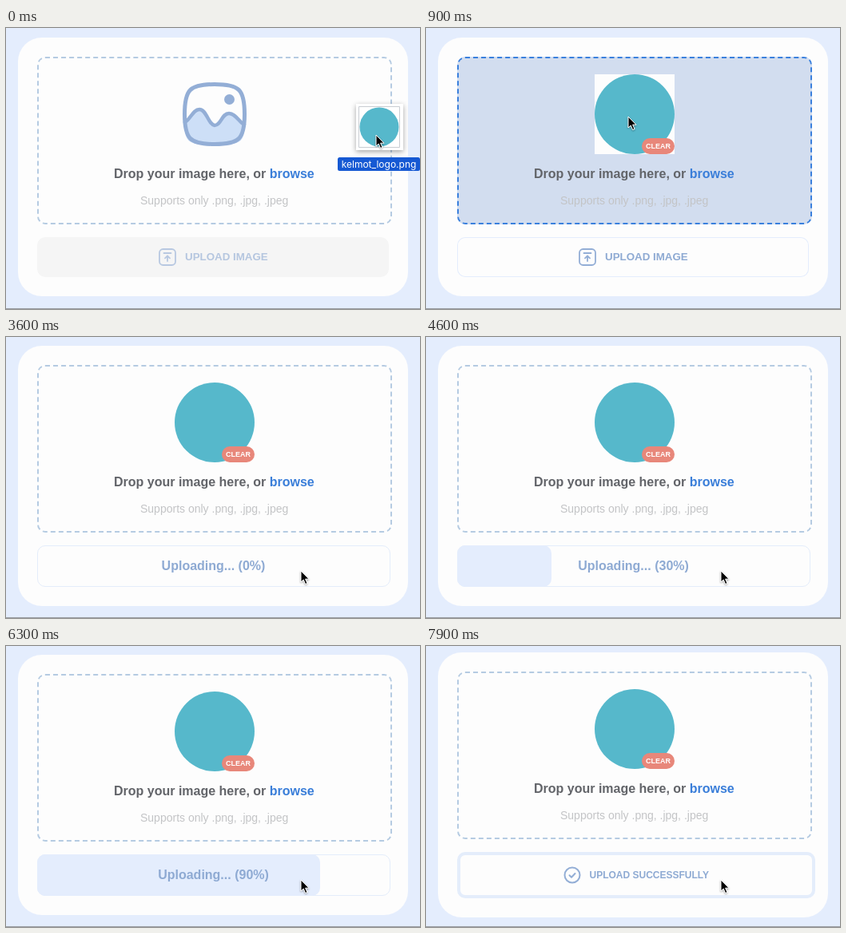
These frames come from a looping animation (518x352 px, 8000 ms). An HTML page:

```html
<!DOCTYPE html>
<html lang="en">
<head>
<meta charset="utf-8">
<title>Image upload</title>
<style>
  html, body { margin: 0; width: 100%; height: 100%; overflow: hidden; background: #e4edfd; }
  #stage { position: relative; width: 518px; height: 352px; overflow: hidden; }
  #stage > * { position: absolute; box-sizing: border-box; }
  #card { left: 15px; width: 488px; border-radius: 30px; background: #fdfdfd; }
  #zone { left: 39px; width: 444px; height: 210px; border: 2px dashed; border-radius: 10px; }
  #button { left: 39px; border: 0 solid #e4edfb; border-radius: 10px; }
  #bar { left: 39px; border-radius: 10px; background: #e4edfd; }
  svg { left: 0; top: 0; }
  text { font-family: "Liberation Sans", Arial, sans-serif; font-weight: bold; }
  .line { fill: none; stroke: #93aed6; stroke-linecap: round; stroke-linejoin: round; }
</style>
</head>
<body>
<div id="stage">
  <div id="card"></div>
  <div id="zone"></div>
  <div id="button"></div>
  <div id="bar"></div>
  <svg width="518" height="352" viewBox="0 0 518 352">
    <defs>
      <filter id="soft" x="-40%" y="-40%" width="180%" height="180%">
        <feDropShadow dx="0" dy="2" stdDeviation="3" flood-color="#000" flood-opacity=".35"/>
      </filter>
      <filter id="tight" x="-40%" y="-40%" width="180%" height="180%">
        <feDropShadow dx="0" dy="1" stdDeviation="1" flood-color="#000" flood-opacity=".4"/>
      </filter>
    </defs>
    <g id="content">
      <g id="placeholder">
        <path fill="#cddff7" d="M224 118C231 114 234 102 242 102C251 102 253 121 261 122C269 122 270 107 279 107C287 107 292 118 298 121V128Q298 145 281 145H241Q224 145 224 128Z"/>
        <path class="line" stroke-width="4.5" d="M224 118C231 114 234 102 242 102C251 102 253 121 261 122C269 122 270 107 279 107C287 107 292 118 298 121"/>
        <path class="line" stroke-width="5" d="M261 70.500C292 70.500 298.500 77 298.500 108S292 145.500 261 145.500S223.500 139 223.500 108S230 70.500 261 70.500Z"/>
        <circle cx="279.500" cy="89.500" r="6.500" fill="#93aed6"/>
      </g>
      <g id="preview">
        <path fill="#fdfdfd" d="M211 58h100v100h-100z"/>
        <circle cx="261" cy="108" r="50" fill="#56b8cb"/>
        <rect x="270" y="138" width="41" height="20" rx="10" fill="#e8877a"/>
        <text x="290.500" y="151.200" font-size="9" fill="#fff" text-anchor="middle">CLEAR</text>
      </g>
      <text x="135" y="188" font-size="16" fill="#626469">Drop your image here, or <tspan fill="#3a7ed9">browse</tspan></text>
      <text x="168" y="221" font-size="14" fill="#c3c4c6" style="font-weight:normal">Supports only .png, .jpg, .jpeg</text>
    </g>
    <g id="ready">
      <rect class="line" x="192" y="277" width="20" height="20" rx="4.500" stroke-width="1.800"/>
      <path class="line" stroke-width="1.800" d="M197.500 282H206.500M202 292V285.500M199 288.300L202 285.300L205 288.300"/>
      <text x="224" y="291" font-size="13.333" fill="#8eaad3">UPLOAD IMAGE</text>
    </g>
    <text id="percent" x="259.500" y="292" font-size="16" fill="#8eaad3" text-anchor="middle"></text>
    <g id="done">
      <circle class="line" cx="183" cy="287" r="9.500" stroke-width="2"/>
      <path class="line" stroke-width="2" d="M179.500 287.300L182 289.700L186.500 285"/>
      <text x="204.500" y="291" font-size="12" fill="#8eaad3">UPLOAD SUCCESSFULLY</text>
    </g>
    <path fill="#9a9da3" d="M0 351H518V352H0Z"/>
    <g id="cursor">
      <g id="ghost">
        <path filter="url(#soft)" fill="#fff" d="M-25-39h59v58h-59z"/>
        <path fill="none" stroke="#c9cdd2" d="M-21.500-35.500h51v51h-51z"/>
        <circle cx="4" cy="-10" r="24.500" fill="#56b8cb"/>
        <rect x="-48" y="28" width="103" height="17" rx="2.500" fill="#1659d3"/>
        <text x="3.500" y="41" font-size="12" fill="#fff" text-anchor="middle" style="font-family:Inter,sans-serif;font-weight:normal">kelmot_logo.png</text>
      </g>
      <path filter="url(#tight)" fill="#000" stroke="#fff" stroke-width="1" d="M0 0V14L3.200 11L5.600 16.500L8 15.500L5.600 10.200H10Z"/>
    </g>
  </svg>
</div>
<script>
const LOOP = 8000, DROP = 720, CLICK = 3000, SUCCESS = 6600;
const UPLOADS = [4300, 5280, 6105];
const $ = id => document.getElementById(id);
const clamp = v => Math.max(0, Math.min(1, v));
const mix = (a, b, k) => a + (b - a) * k;
const rgb = (a, b, k) => `rgb(${a.map((v, i) => Math.round(mix(v, b[i], k)))})`;
const show = (id, on) => { $(id).style.display = on ? '' : 'none'; };
const smooth = v => v * v * (3 - 2 * v);

// CSS "ease": cubic-bezier(.25, .1, .25, 1)
function ease(x) {
  if (x <= 0 || x >= 1) return clamp(x);
  const curve = (a, b, s) => 3 * a * s * (1 - s) ** 2 + 3 * b * s * s * (1 - s) + s ** 3;
  let lo = 0, hi = 1;
  for (let i = 0; i < 20; i++) {
    const mid = (lo + hi) / 2;
    if (curve(.25, .25, mid) < x) lo = mid; else hi = mid;
  }
  return curve(.1, 1, lo);
}
const fade = (t, start, length) => ease((t - start) / length);

function place(id, props) {
  for (const key in props) $(id).style[key] = props[key] + 'px';
}

function cursorAt(t) {
  const drag = smooth(clamp(t / 700));
  if (t < 1300) return [mix(463, 253, drag), mix(134, 111, drag)];
  const out = smooth(clamp((t - 1300) / 1200));
  return [mix(253, 369, out), mix(111, 293, out)];
}

function render(t) {
  const busy = t >= CLICK, success = t >= SUCCESS;
  const border = fade(t, CLICK, 300) + 3 * fade(t, SUCCESS, 400);
  const over = fade(t, 100, 300) - fade(t, 900, 400);
  const enabled = fade(t, DROP, 160);
  const hover = fade(t, 2250, 300) - fade(t, CLICK, 300);

  place('card', { top: 12 - border, height: 324 + 2 * border });
  place('zone', { top: 36 - border });
  $('zone').style.borderColor = rgb([181, 203, 226], [58, 128, 221], over);
  $('zone').style.background = `rgba(210,221,239,${over})`;
  $('content').setAttribute('transform', `translate(0 ${-border})`);
  show('placeholder', t < DROP);
  show('preview', t >= DROP);

  const box = { top: 262 - border, height: 50 + 2 * border };
  place('button', { ...box, width: 440 + 2 * border, borderWidth: border });
  const fill = rgb([245, 245, 245], [253, 253, 253], enabled);
  $('button').style.background = hover > 0 ? rgb([253, 253, 253], [228, 237, 253], hover) : fill;
  $('button').style.boxShadow = busy ? 'none' : `inset 0 0 0 1px rgba(228,237,253,${enabled})`;

  const progress = UPLOADS.reduce((sum, start) => sum + .3 * fade(t, start, 500), 0);
  place('bar', { ...box, width: 442 * progress });
  show('bar', progress > 0 && !success);
  $('percent').textContent = `Uploading... (${30 * UPLOADS.filter(start => t >= start).length}%)`;

  show('ready', !busy);
  $('ready').style.opacity = mix(.62, 1, enabled);
  show('percent', busy && !success);
  show('done', success);

  $('cursor').setAttribute('transform', `translate(${cursorAt(t)})`);
  show('ghost', t < DROP);
}

const begin = performance.now();
function tick() {
  render((performance.now() - begin) % LOOP);
  requestAnimationFrame(tick);
}
tick();
</script>
</body>
</html>
```
